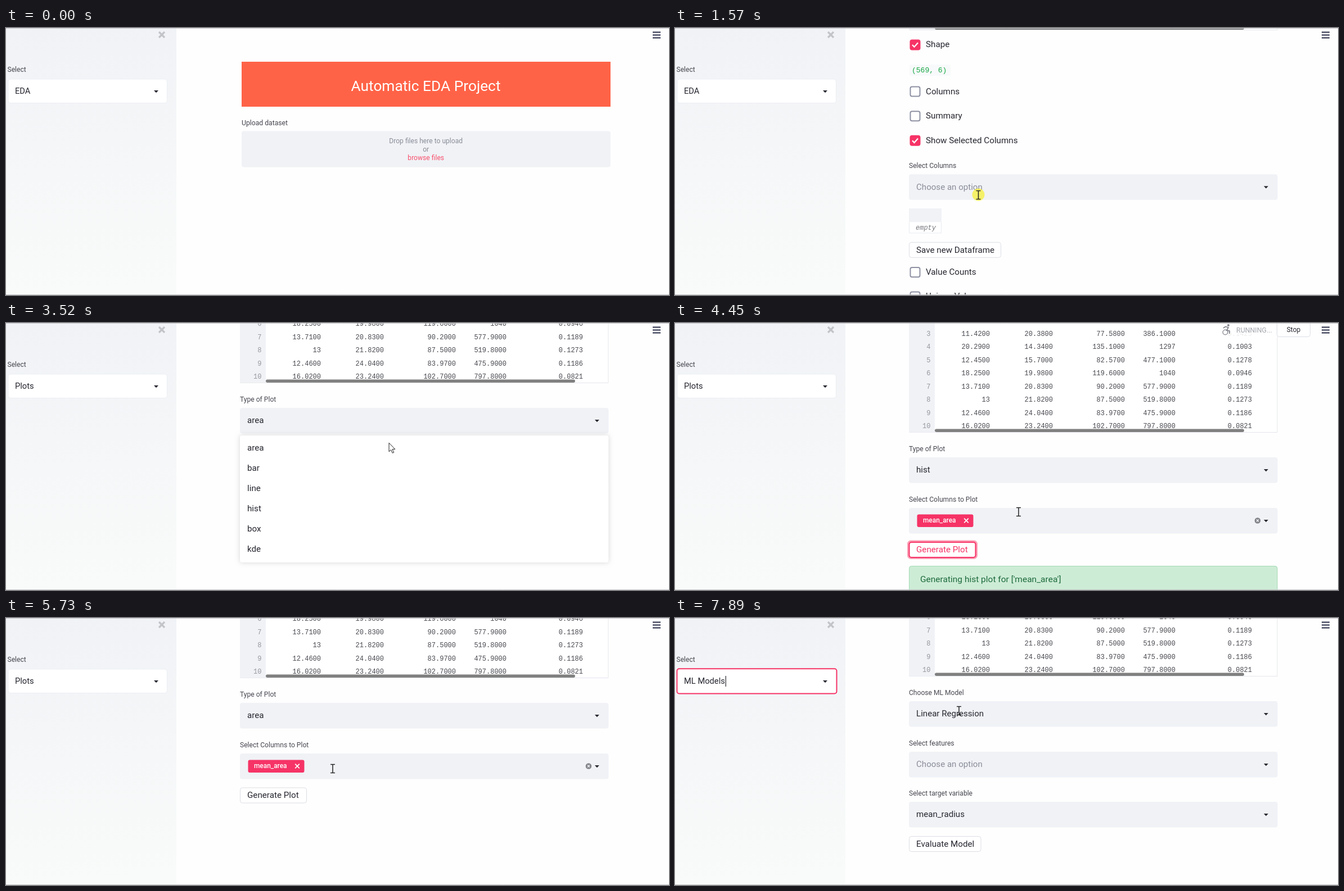
Recreate the animation shown at these times as an HTML page with a canvas. Size 1179 by 475 pixels, loop 8 s.

```html
<!DOCTYPE html>
<html>
<head>
<meta charset="utf-8">
<style>
html, body { margin: 0; width: 100%; height: 100%; overflow: hidden; background: #fff }
canvas { display: block }
</style>
</head>
<body>
<canvas id="stage" width="1179" height="475"></canvas>
<script>
const ctx = document.getElementById('stage').getContext('2d');
const SANS = 'Roboto, sans-serif', MONO = '"Liberation Mono", monospace',
      PLOT = '"DejaVu Sans", sans-serif', CHART = '"Liberation Sans", sans-serif';
const INK = '#262730', PINK = '#f63366', PALE = '#f0f2f6', GREY = '#8b8d99';
const LEFT = 416, WIDTH = 655.5;

// ---------- story ----------
const bursts = [[70, 810], [880, 1640], [1720, 2430], [2580, 2810], [2960, 3210], [3370, 3910],
  [4080, 4840], [4910, 4980], [5130, 5730], [5880, 6190], [6360, 7030], [7200, 7890]];
// Pointer path: time, x, y and what is clicked there
const path = [
  [70, 840, 330], [230, 747, 231, 'browse'], [1030, 427, 215, 'shape'], [1330, 427, 200, 'choose'],
  [1560, 539.5, 297, 'openColumns'], [2110, 427, 405, 'heat'], [2657, 649, 281],
  [2955, 200, 113, 'openPages'], [3120, 60, 192, 'plots'], [3450, 740, 175, 'openType'], [3680, 500, 331, 'hist'],
  [4080, 700, 264, 'openTags'], [4200, 500, 421, 'tagArea'], [4300, 475, 316, 'generateHist'], [4380, 611, 336],
  [5350, 740, 175, 'openTypeAgain'], [5500, 500, 223, 'area'], [5730, 581, 268],
  [5875, 581, 268, 'openMoreTags'], [6358, 500, 385, 'tagPerimeter'], [6505, 475, 316, 'generateArea'],
  [6950, 505, 320], [7350, 150, 113, 'openPagesAgain'], [7550, 60, 228, 'models'], [7885, 505, 165]];
// Scrolls: start, end, where to
const scrolls = [[560, 1330, 546], [1720, 2000, 706], [2110, 2430, 1063], [3120, 3121, 443],
  [4300, 4380, 355], [4460, 4840, 685], [5130, 5280, 443], [6580, 6950, 685]];

const when = Object.fromEntries(path.filter(p => p[3]).map(p => [p[3], p[0]]));
let t = 0;
const since = action => t - when[action];
const done = action => since(action) >= 0;
const between = (a, b) => done(a) && !done(b);
const ease = p => p * p * (3 - 2 * p);
const clamp = p => Math.max(0, Math.min(1, p));

function snap(time) {
  const burst = bursts.filter(([a]) => time >= a).pop();
  if (!burst) return 0;
  const [a, b] = burst, n = Math.round((b - a) / 78), step = (b - a) / n;
  return a + step * Math.min(n, Math.floor((time - a + 8) / step));
}
function pointerAt() {
  const i = path.findIndex(p => p[0] > t);
  if (i < 0) return path[path.length - 1].slice(1, 3);
  const a = path[Math.max(0, i - 1)], b = path[i], p = ease(clamp((t - a[0]) / (b[0] - a[0])));
  return [1, 2].map(k => a[k] + (b[k] - a[k]) * p);
}
function scrollAt() {
  const y = scrolls.reduce((y, [a, b, to]) => y + (to - y) * ease(clamp((t - a) / (b - a))), 0);
  return done('models') ? Math.min(y, 446) : y;
}

// ---------- drawing helpers ----------
function text(s, x, y, size = 15.2, color = INK, align = 'left', font = SANS, style = '') {
  ctx.font = `${style} ${size}px ${font}`;
  ctx.textAlign = align;
  ctx.textBaseline = 'middle';
  ctx.fillStyle = color;
  ctx.fillText(s, x, y);
  return ctx.measureText(s).width;
}
function box(x, y, w, h, fill, r = 0, stroke, lw = 1) {
  ctx.beginPath();
  ctx.roundRect(x, y, w, h, r);
  if (fill) { ctx.fillStyle = fill; ctx.fill(); }
  if (stroke) { ctx.strokeStyle = stroke; ctx.lineWidth = lw; ctx.stroke(); }
}
function line(points, color, lw = 1) {
  ctx.beginPath();
  points.forEach(([x, y]) => ctx.lineTo(x, y));
  ctx.strokeStyle = color;
  ctx.lineWidth = lw;
  ctx.stroke();
}
function poly(points, fill) {
  ctx.beginPath();
  points.forEach(([x, y]) => ctx.lineTo(x, y));
  ctx.closePath();
  ctx.fillStyle = fill;
  ctx.fill();
}
function disc(x, y, r, fill, stroke) { box(x - r, y - r, 2 * r, 2 * r, fill, r, stroke, 1.3); }
function cross(x, y, r, color, lw) {
  for (const d of [-r, r]) line([[x - r, y - d], [x + r, y + d]], color, lw);
}
function upright(s, x, y, align) {
  ctx.save();
  ctx.translate(x, y);
  ctx.rotate(-Math.PI / 2);
  text(s, 0, 0, 14, '#000', align, PLOT);
  ctx.restore();
}
const caret = (x, y) => poly([[x - 4, y - 2], [x + 4, y - 2], [x, y + 2.3]], INK);

function expandIcon(x, y) {
  for (const d of [-1, 1]) {
    line([[x + d, y + d], [x + d * 6, y + d * 6]], '#c6c7ca', 1.6);
    line([[x + d * 2, y + d * 6], [x + d * 6, y + d * 6], [x + d * 6, y + d * 2]], '#c6c7ca', 1.6);
  }
}
function menu(options, x, y, w) {
  ctx.save();
  ctx.shadowColor = 'rgba(0,0,0,.16)';
  ctx.shadowBlur = 8;
  box(x, y, w, options.length * 36 + 10, '#fff', 4);
  ctx.restore();
  options.forEach((o, i) => text(o, x + 13, y + 23 + i * 36));
}

// ---------- widgets ----------
let fields = [];

function field(label, y, value, tags = []) {
  const top = y + 15, mid = y + 38;
  text(label, LEFT, y, 12.1, '#45464f');
  box(LEFT, top, WIDTH, 45.5, PALE, 4);
  fields.push(top);
  if (!tags.length) text(value || 'Choose an option', 429, mid, 15.1, value ? INK : GREY);
  let x = 430.5;
  for (const tag of tags) {
    ctx.font = `500 11.9px ${SANS}`;
    const w = ctx.measureText(tag).width + 41.5;
    box(x, mid - 11.5, w, 22.5, PINK, 3);
    text(tag, x + 10.5, mid - .5, 11.9, '#fff', 'left', SANS, '500');
    cross(x + w - 12.5, mid - .5, 3.8, '#fff', 1.7);
    x += w + 9.5;
  }
  if (tags.length) {
    disc(1036, mid - .5, 5.3, '#85868c');
    cross(1036, mid - .5, 2, PALE, 1.3);
  }
  caret(1051, mid);
}
function button(label, y, w, focused) {
  if (focused) box(415.5, y - .5, w + 1, 28.5, '#fff', 4, '#fb9fb6', 5);
  box(LEFT + .5, y + .5, w - 1, 27, '#fff', 4, focused ? PINK : '#dcdee5', focused ? 2 : 1);
  text(label, 429, y + 14.5, 15.2, focused ? PINK : INK);
}
function checkbox(label, y, on, hover) {
  if (hover) box(LEFT, y - 11, WIDTH, 22, PALE, 4);
  if (on) {
    box(417.5, y - 9.5, 19, 19, PINK, 4);
    line([[422, y], [425.5, y + 3.7], [432, y - 3.7]], '#fff', 2.2);
  } else box(418.5, y - 8.5, 17, 17, '#fff', 3, '#8e91a3', 2);
  text(label, 446, y);
}
const code = (s, y) => text(s, 421, y + 1, 13, '#17a844', 'left', MONO);

const columns = ['mean_radius', 'mean_texture', 'mean_perimeter', 'mean_area', 'mean_smoothness'];
const columnEnds = [560, 672, 800, 890, 1026];
const rows = `17.99 10.38 122.8 1001 .1184
20.57 17.77 132.9 1326 .0847
19.69 21.25 130 1203 .1096
11.42 20.38 77.58 386.1 .1425
20.29 14.34 135.1 1297 .1003
12.45 15.7 82.57 477.1 .1278
18.25 19.98 119.6 1040 .0946
13.71 20.83 90.2 577.9 .1189
13 21.82 87.5 519.8 .1273
12.46 24.04 83.97 475.9 .1186
16.02 23.24 102.7 797.8 .0821`.split('\n').map(r => r.split(' '));

function table() {
  box(LEFT + .5, 267.5, WIDTH - 1, 282, '#fff', 0, '#e4e6ec');
  box(LEFT, 268, WIDTH, 23, PALE);
  box(LEFT, 268, 46, 281.5, PALE);
  columns.forEach((c, k) => text(c, columnEnds[k], 280.5, 12, '#85868c', 'right', MONO));
  rows.forEach((row, i) => {
    const y = 304 + 23.5 * i;
    text(i, 454.5, y, 12, '#95979f', 'right', MONO);
    row.forEach((v, k) => text(+v % 1 ? (+v).toFixed(4) : v, columnEnds[k], y, 12, '#4a4b52', 'right', MONO));
  });
  box(462, 543.5, 550, 5.5, '#808080', 3);
}
function uploader(loaded) {
  ctx.save();
  if (!loaded) ctx.translate(3, 0);
  box(LEFT, 60, WIDTH + .5, 80, '#ff6347');
  text('Automatic EDA Project', 743.5, 104, 26.3, '#fff', 'center');
  text('Upload dataset', LEFT, 169, 12.2, '#45464f');
  box(LEFT, 183.5, WIDTH + .5, 64, PALE, 4);
  ['Drop files here to upload', 'or', 'browse files'].forEach((s, i) =>
    text(s, 743.7, 201.5 + i * 15, 12.1, i < 2 ? GREY : '#f8506c', 'center'));
  ctx.restore();
}

// ---------- plots ----------
const rocket = ['03051a', '35193e', '701f57', 'ad1759', 'e13342', 'f37651', 'f6b48f', 'faebdd']
  .map(h => [0, 2, 4].map(i => parseInt(h.substr(i, 2), 16)));
function heatColor(v) {
  const p = Math.min(6.999, clamp((v + .74) / 1.74) * 7), i = Math.floor(p);
  return `rgb(${rocket[i].map((a, k) => Math.round(a + (rocket[i + 1][k] - a) * (p - i)))})`;
}
// Lower triangle of the correlation matrix
const corr = [[1], [.32, 1], [1, .33, 1], [.99, .32, .99, 1], [.17, -.023, .21, .18, 1],
  [-.73, -.42, -.74, -.71, -.36, 1]];

function heatmap(y) {
  const top = y + 130, w = 67.8, h = 63.15, names = [...columns, 'diagnosis'];
  code('AxesSubplot(0.125,0.11;0.62x0.77)', y + 44);
  expandIcon(1091, y + 83);
  ctx.save();
  ctx.beginPath();
  ctx.rect(LEFT, y, WIDTH, 700);
  ctx.clip();
  names.forEach((name, i) => {
    const mid = top + (i + .5) * h, x = 498 + (i + .5) * w;
    names.forEach((_, k) => {
      const v = corr[Math.max(i, k)][Math.min(i, k)];
      box(498 + k * w, top + i * h, w + .4, h + .4, heatColor(v));
      text(v, 498 + (k + .5) * w, mid, 14, v > .9 ? '#262626' : '#fff', 'center', PLOT);
    });
    text(name, 488, mid + 1, 14, '#000', 'right', PLOT);
    line([[492, mid], [498, mid]], '#000');
    line([[x, top + 6 * h], [x, top + 6 * h + 5]], '#000');
    upright(name, x, top + 6 * h + 10, 'right');
  });
  for (let i = 0; i < 60; i++) box(930, top + i * 6.315, 20, 6.8, heatColor(1 - 1.74 * (i + .5) / 60));
  for (let v = 10; v >= -6; v -= 2) {
    const ty = top + (10 - v) * 21.75;
    line([[950, ty], [955, ty]], '#000');
    text((v / 10).toFixed(1).replace('-', '\u2212'), 959, ty + 1, 14, '#000', 'left', PLOT);
  }
  ctx.restore();
}

const rnd = i => { const s = Math.sin(i * 12.9898) * 43758.5453; return s - Math.floor(s); };
const peaks = { 81: 1880, 180: 2250, 212: 2500, 352: 2010, 461: 2550 };
// Mostly small samples mixed with a share of large ones
const areas = Array.from({ length: 569 }, (_, i) => {
  const large = rnd(i + 1) < (i < 30 ? .8 : .3), r = rnd(i + 801);
  return peaks[i] || (large ? 650 + 800 * r ** 1.6 : 250 + 400 * r);
});

function histogram() {
  const x0 = 498, y0 = 1240, h = 350, bins = Array(10).fill(0);
  areas.forEach(v => bins[Math.min(9, Math.floor((v - 143) / 236))]++);
  bins.forEach((n, i) => box(x0 + 23 + i * 46, y0 - n * 1.4, 46.3, n * 1.4, '#1f77b4'));
  box(x0, y0 - h, 507, h, null, 0, '#000');
  for (let v = 0; v <= 225; v += 25) {
    line([[x0 - 5, y0 - v * 1.4], [x0, y0 - v * 1.4]], '#000');
    text(v, x0 - 9, y0 - v * 1.4 + 1, 14, '#000', 'right', PLOT);
  }
  for (let v = 500; v <= 2500; v += 500) {
    const x = x0 + 23 + (v - 143) * .195;
    line([[x, y0], [x, y0 + 5]], '#000');
    text(v, x, y0 + 16, 14, '#000', 'center', PLOT);
  }
  upright('Frequency', 444, y0 - h / 2, 'center');
  expandIcon(1091, 863);
}
function areaChart() {
  const X = v => 447.5 + v * .8125, Y = v => 1109 - v * .0994;
  for (let v = 0; v <= 600; v += 50) {
    line([[X(v), 851], [X(v), 1114]], '#ddd');
    text(v, v === 0 ? 450 : v === 600 ? 927 : X(v), 1121, 9.5, '#222', 'center', CHART);
  }
  for (let v = 0; v <= 2500; v += 500) {
    line([[442, Y(v)], [935, Y(v)]], '#ddd');
    line([[442, Y(v)], [447, Y(v)]], '#888');
    text(v.toLocaleString('en-US'), 441, Y(v) + .5, 9.5, '#222', 'right', CHART);
  }
  box(447.5, 851.5, 487.5, 257.5, null, 0, '#ddd');
  const area = (f, color) => poly([[X(0), Y(0)], ...areas.map((v, i) => [X(i), Y(f(v))]), [X(568), Y(0)]], color);
  area(v => v, 'rgba(76,120,168,.7)');
  area(v => 3.54 * Math.sqrt(v), '#d68c42');
  line([[447.5, 851], [447.5, 1109], [935, 1109]], '#888');
  ['#7f9fc4', '#df9657'].forEach((color, i) => {
    disc(957, 856 + i * 12.3, 4.8, color);
    text(['mean_area', 'mean_perimeter'][i], 967, 856.5 + i * 12.3, 9.4, '#222', 'left', CHART);
  });
  disc(1058.5, 863.5, 13, '#fff', '#999');
  for (const d of [-5, 0, 5]) disc(1058.5 + d, 863.5, 1.9, '#111');
  expandIcon(1091, 863);
}

// ---------- pages ----------
function edaPage() {
  let y = 576, columnsY;
  const check = (label, on, extra = 0, hover) => { checkbox(label, y, on, hover); y += 43.6 + (on ? extra : 0); };
  if (done('shape')) {
    box(417, y + 35, 73, 20, '#f8f9fb', 3);
    code('(569, 6)', y + 45);
  }
  check('Shape', done('shape'), 39.5);
  check('Columns');
  check('Summary');
  if (done('choose')) {
    columnsY = y + 45;
    field('Select Columns', columnsY);
    box(LEFT + .5, y + 121.5, 57, 43, '#fff', 0, '#e8eaef');
    box(LEFT, y + 121, 58, 24, PALE);
    text('empty', 446, y + 155.5, 12, '#77787e', 'center', MONO, 'italic');
    button('Save new Dataframe', y + 180.5, 164);
  }
  check('Show Selected Columns', done('choose'), 190.5);
  check('Value Counts');
  check('Unique Values');
  check('Handling NaN values');
  if (done('heat')) heatmap(y);
  check('Heatmap', done('heat'), 0, between('heat', 'openPages'));
  if (since('openColumns') > 70 && since('openColumns') < 240) menu(columns, LEFT, columnsY + 64, WIDTH);
}
function plotsPage() {
  const type = between('hist', 'area') ? 'hist' : 'area';
  const tags = ['mean_area', 'mean_perimeter'].filter((_, i) => done(['tagArea', 'tagPerimeter'][i]));
  const generated = between('generateHist', 'area') || done('generateArea');
  field('Type of Plot', 579, type);
  field('Select Columns to Plot', 669, '', tags);
  button('Generate Plot', 744.5, 119, generated);
  if (generated) {
    box(LEFT + .5, 787.5, WIDTH - 1, 47.5, '#cdecd6', 4, '#a2dab3');
    text(`Generating ${type} plot for [${tags.map(s => `'${s}'`).join(', ')}]`, 436, 811.5, 15.5, '#1d6b3c');
    if (since('generateArea') > 150) areaChart();
    else if (since('generateHist') > 200) histogram();
  }
  if (between('openType', 'hist') || between('openTypeAgain', 'area'))
    menu(['area', 'bar', 'line', 'hist', 'box', 'kde'], LEFT, 643, WIDTH);
  if (between('openTags', 'tagArea') || between('openMoreTags', 'tagPerimeter'))
    menu([...columns, 'diagnosis'].filter(c => !tags.includes(c)), LEFT, 733, WIDTH);
}
function modelsPage() {
  field('Choose ML Model', 579, 'Linear Regression');
  field('Select features', 669);
  field('Select target variable', 758, 'mean_radius');
  button('Evaluate Model', 834, 128.5);
}

// ---------- frame around the page ----------
function sidebar() {
  const shade = ctx.createLinearGradient(0, 0, 40, 475);
  shade.addColorStop(0, PALE);
  shade.addColorStop(1, '#f9fbfa');
  box(0, 0, 303, 475, shade);
  cross(277, 12, 5, '#c2c4c8', 3.2);
  text('Select', 2.5, 74, 12.1, '#45464f');
  const focused = between('openPages', 'openType') || done('openPagesAgain');
  const page = done('models') ? 'ML Models' : done('plots') ? 'Plots' : 'EDA';
  if (focused) box(3.5, 90.2, 284, 44.3, '#fff', 4, PINK, 2);
  else box(4, 91, 282.5, 42.5, '#fff', 4, '#eceef2');
  const w = text(page, 16, 113, 14.7);
  if (focused) line([[17.5 + w, 103], [17.5 + w, 122]], INK, 1.2);
  caret(267, 113);
  if (between('openPages', 'plots') || between('openPagesAgain', 'models'))
    menu(['EDA', 'Plots', 'ML Models'], 4, 137, 282);
}
function runner() {
  box(968, 0, 103, 25, 'rgba(255,255,255,.9)');
  disc(984, 4, 2, '#85868f');
  line([[975, 9], [979, 6.5], [984, 8], [981, 13], [986, 14], [986, 19]], '#85868f', 1.8);
  disc(978.5, 16.5, 4.3, null, '#85868f');
  text('RUNNING...', 998, 13, 12.4, '#a4a6ae');
  box(1070.5, -4, 59, 28.5, '#fff', 4, '#dcdee5');
  text('Stop', 1100, 12, 12, INK, 'center');
}
function pointer(scroll) {
  const [x, y] = pointerAt();
  if (Object.keys(when).some(a => done(a) && since(a) < 74)) disc(x, y - .5, 11, 'rgba(247,240,50,.72)');
  const overField = x > LEFT && x < LEFT + WIDTH
    && fields.some(top => y + scroll > top && y + scroll < top + 45.5);
  ctx.save();
  ctx.translate(x, y);
  if (overField) {
    for (const d of [-7.5, 7.5]) line([[-4, d], [4, d]], '#222', 1.4);
    line([[0, -7.5], [0, 7.5]], '#222', 1.5);
  } else {
    const arrow = [[0, 0], [0, 15.5], [3.6, 12.3], [6.2, 18], [8.6, 17], [6, 11.3], [10.8, 11.2]];
    poly(arrow, '#fff');
    line([...arrow, [0, 0]], '#222', 1);
  }
  ctx.restore();
}

function draw(now) {
  t = snap(now % 8000);
  const scroll = scrollAt(), loaded = since('browse') > 300;
  fields = [];
  box(0, 0, 1179, 475, '#fefefe');
  ctx.save();
  ctx.translate(0, -scroll);
  uploader(loaded);
  if (loaded) {
    table();
    (done('models') ? modelsPage : done('plots') ? plotsPage : edaPage)();
  }
  ctx.restore();
  sidebar();
  // Every choice, but not the opening of a menu, makes the app rerun
  if (Object.keys(when).some(a => !a.startsWith('open') && done(a) && since(a) < 200)) runner();
  for (const y of [7.5, 12.5, 17.5]) line([[1150, y], [1164, y]], '#262a45', 2);
  for (const y of [.5, 474.5]) line([[0, y], [1179, y]], '#c6c7ca');
  if (t >= 70) pointer(scroll);
  requestAnimationFrame(draw);
}
requestAnimationFrame(draw);
</script>
</body>
</html>
```
